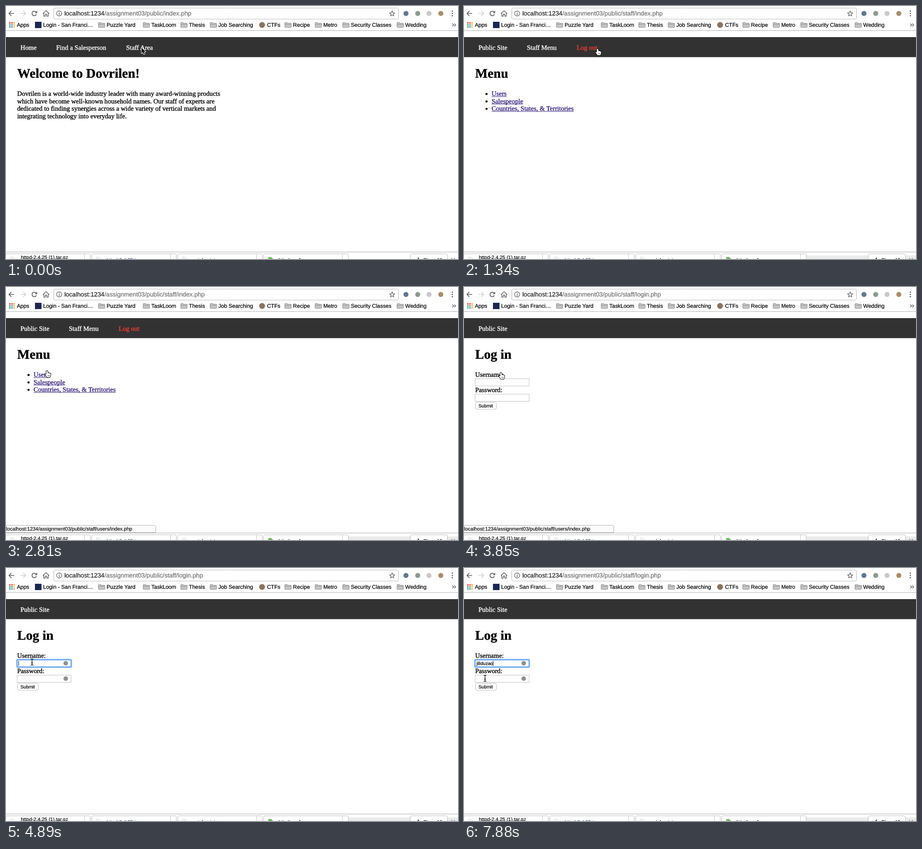
These frames come from a looping animation (999 by 561 pixels, 8 s). An HTML page with a canvas:

```html
<!DOCTYPE html>
<html lang="en">
<head>
<meta charset="utf-8">
<title>Staff login</title>
<style>
html, body { margin: 0; width: 100%; height: 100%; overflow: hidden; background: #fff }
canvas { display: block }
</style>
</head>
<body>
<canvas id="stage" width="999" height="561"></canvas>
<script>
const ctx = document.getElementById('stage').getContext('2d');
const LOOP = 8000, TICK = 148.6;
const SERIF = '"Liberation Serif", serif', SANS = '"Liberation Sans", sans-serif';
const BODY = 14.6, BASE = 'localhost:1234', SITE = '/assignment03/public/';
const USER = 'jiliduzao';
const KEY_TIMES = [5490, 5790, 5940, 6090, 6240, 6540, 6690, 6830, 6980];
const FOLDERS = [[204, 'Puzzle Yard'], [303, 'TaskLoom'], [386, 'Thesis'], [451, 'Job Searching'],
  [616, 'Recipe'], [683, 'Metro'], [744, 'Security Classes'], [864, 'Wedding']];

ctx.textRendering = 'geometricPrecision';
ctx.lineJoin = 'round';

// A hairline stroke gives the fuller weight of desktop font smoothing
function text(s, x, y, size, color = '#000', family = SERIF, weight = '') {
  ctx.font = `${weight} ${size}px ${family}`;
  ctx.fillStyle = ctx.strokeStyle = color;
  ctx.lineWidth = family == SERIF ? 0.4 : 0.25;
  ctx.fillText(s, x, y);
  ctx.strokeText(s, x, y);
  return ctx.measureText(s).width;
}
function rect(x, y, w, h, color) {
  ctx.fillStyle = color;
  ctx.fillRect(x, y, w, h);
}
function box(x, y, w, h, r, fill, stroke, line = 1) {
  ctx.beginPath();
  ctx.roundRect(x, y, w, h, r);
  paint(fill, stroke, line);
}
function disc(x, y, r, fill, stroke, line) {
  ctx.beginPath();
  ctx.arc(x, y, r, 0, 7);
  paint(fill, stroke, line);
}
function paint(fill, stroke, line = 1) {
  if (fill) { ctx.fillStyle = fill; ctx.fill(); }
  if (stroke) { ctx.strokeStyle = stroke; ctx.lineWidth = line; ctx.stroke(); }
}
function shape(d, x, y, fill, stroke, line = 1) {
  const path = new Path2D(d);
  ctx.save();
  ctx.translate(x, y);
  if (stroke) { ctx.strokeStyle = stroke; ctx.lineWidth = line; ctx.stroke(path); }
  if (fill) { ctx.fillStyle = fill; ctx.fill(path); }
  ctx.restore();
}

// Progress of a move seen in discrete screen captures
function stepped(t, start, steps) {
  const i = Math.floor((t - start) / TICK + 0.02) + 1;
  const p = Math.min(1, Math.max(0, i / steps));
  return p * p * (3 - 2 * p);
}
const mix = (a, b, p) => a + (b - a) * p;
const within = (t, a, b) => t >= a && t < b;

function toolbar(t, url) {
  const ink = '#5a5a5a';
  shape('M6 -5.5L0.5 0L6 5.5M0.5 0H12', 6, 16.5, null, ink, 1.7);
  shape('M6 -5.5L11.5 0L6 5.5M11.5 0H0', 32, 16.5, null, '#d0d0d0', 1.7);
  if (within(t, 890, 1190) || within(t, 3560, 3850)) {
    shape('M-5 -5L5 5M5 -5L-5 5', 63, 16.5, null, ink, 1.7);
  } else {
    ctx.beginPath();
    ctx.arc(62.5, 16.5, 5, 0.4, 5.5);
    paint(null, ink, 1.7);
    shape('M6 -6V-0.8H0.8Z', 62.8, 16.5, ink);
  }
  shape('M-7 0.5L0 -6L7 0.5M-5 -1V6H-1.6V1.5H1.6V6H5V-1', 88.5, 16.5, null, ink, 1.4);

  box(105.5, 4.5, 762, 24.5, 3, '#fff', '#b9b9b9');
  disc(117.5, 16.5, 5.6, null, ink, 1.2);
  rect(116.8, 15.5, 1.5, 4.5, ink);
  rect(116.8, 12.8, 1.5, 1.6, ink);
  const w = text(BASE, 129, 21, 13.72, '#222', SANS);
  text(SITE + url, 129 + w, 21, 13.72, '#707070', SANS);

  ctx.beginPath();
  for (let i = 0; i < 10; i++) {
    const r = i % 2 ? 2.7 : 6.2, a = i * Math.PI / 5 - Math.PI / 2;
    ctx.lineTo(853.5 + r * Math.cos(a), 17 + r * Math.sin(a));
  }
  ctx.closePath();
  paint(null, ink, 1.2);
  disc(884, 16.5, 5.5, '#61788e');
  disc(910, 16.5, 5.5, '#8c9a90');
  disc(935, 16.5, 5.5, '#c9c9c9');
  disc(961, 16.5, 5.5, '#a98c69');
  for (const y of [11.5, 16.5, 21.5]) disc(986.5, y, 1.4, ink);
}

function bookmarks() {
  const label = (s, x) => text(s, x, 45.7, 12, '#000', SANS);
  const dots = ['#e8453c', '#e8453c', '#f0a02c', '#3aa757', '#4285f4', '#f0b92c', '#3aa757', '#4285f4', '#f0b92c'];
  dots.forEach((c, i) => rect(7 + i % 3 * 4.6, 36 + Math.floor(i / 3) * 4.4, 3.1, 3.1, c));
  label('Apps', 24);
  rect(64, 35, 14.5, 14, '#1c2750');
  label('Login - San Franci…', 82);
  for (const [x, name] of FOLDERS) {
    shape('M0.5 9.5V1.5Q0.5 0.5 1.5 0.5H5L6.5 2H13Q14 2 14 3V9.5Q14 10.5 13 10.5H1.5Q0.5 10.5 0.5 9.5Z',
      x, 36.5, '#c4c4c4', '#777', 1.6);
    rect(x + 1, 40, 12.5, 0.8, '#888');
    label(name, x + 18.3);
  }
  disc(566, 42, 6.5, '#8a7460');
  label('CTFs', 577);
  shape('M0 0L3 3L0 6M4.3 0L7.3 3L4.3 6', 986.5, 39, null, '#444', 1.2);
  rect(0, 54, 999, 1, '#b0b0b0');
}

function shelf(t) {
  rect(0, 545, 999, 1, '#a8a8a8');
  if (t >= 150) {
    rect(757, 553, 136, 8, '#ebebeb');
    rect(976, 553, 23, 8, '#ebebeb');
  }
  const files = ['httpd-2.4.25 (1).tar.gz', 'httpd-2.4.25.tar', 'catalog.txt', 'httpd.conf'];
  files.forEach((name, i) => {
    const x = i * 190;
    box(x - 0.5, 549.5, 187, 20, 3, '#fff', '#b9b9b9');
    rect(x + 173, 550, 1, 11, '#c6c6c6');
    shape('M0 8V0H6L10 4V8', x + 10, 557, i == 3 ? '#74b867' : '#f4f4f4', i == 3 ? '#74b867' : '#bbb');
    text(name, x + (i ? 32.5 : 33), i ? 567 : 561.4, 10.9, i == 1 ? '#38587c' : '#111', SANS);
  });
  box(893.5, 549.5, 82, 20, 3, '#fff', '#b9b9b9');
  rect(910, 558, 2.5, 3, '#444');
  text('Show All', 922, 567, 10.9, '#111', SANS);
  shape('M0 0L8 8M8 0L0 8', 984, 559, null, '#777', 1.3);
}

function header(title, links) {
  rect(0, 69, 999, 44.4, '#323232');
  for (const [x, label, color = '#fff'] of links) text(label, x, 97, BODY, color);
  text(title, 24.7, 158.7, BODY * 2, '#000', SERIF, 'bold');
}

function homePage() {
  header('Welcome to Dovrilen!', [[32, 'Home'], [111, 'Find a Salesperson'], [265.5, 'Staff Area']]);
  ['Dovrilen is a world-wide industry leader with many award-winning products',
    'which have become well-known household names. Our staff of experts are',
    'dedicated to finding synergies across a wide variety of vertical markets and',
    'integrating technology into everyday life.'
  ].forEach((line, i) => text(line, 24.7, 199.2 + i * 16.45, BODY));
}

function menuPage() {
  header('Menu', [[32, 'Public Site'], [139, 'Staff Menu'], [249, 'Log out', '#f23c32']]);
  ['Users', 'Salespeople', 'Countries, States, & Territories'].forEach((name, i) => {
    const y = 199.2 + i * 16.45;
    disc(49.8, y - 4, 2.4, '#000');
    const w = text(name, 61, y, BODY, '#35207c');
    rect(61, y + 1.3, w, 1, '#35207c');
  });
}

function loginPage(t) {
  header('Log in', [[32, 'Public Site']]);
  text('Username:', 24.7, 199.2, BODY);
  text('Password:', 24.7, 233.2, BODY);
  for (const y of [203.5, 237.5]) {
    box(24.5, y, 119.5, 16, 0, '#fff', '#c0c0c0');
    if (t >= 4000) disc(132, y + 7.8, 5, '#909090');
  }
  box(25.5, 255.5, 46, 15.5, 3, '#fff', '#bdbdbd');
  text('Submit', 32, 267, 10.2, '#000', SANS);

  if (t >= 4740) {
    box(24, 203, 120.5, 17, 2, null, 'rgba(110,170,245,.45)', 4);
    box(24.5, 203.5, 119.5, 16, 1, null, '#5c9ff0', 1.8);
  }
  const typed = USER.slice(0, KEY_TIMES.filter(k => t >= k).length);
  const w = text(typed, 27.6, 215.3, 10.04, '#000', SANS);
  const caretOff = t < 4890 || within(t, 5340, 5490) || within(t, 7430, 7880);
  if (!caretOff) rect(27.5 + w, 206, 1, 11, '#000');
}

function status(url, fill) {
  box(-2.5, 528.5, 333.5, 16, [0, 3, 0, 0], fill, '#b0b0b0');
  text(BASE + SITE + url, 0.3, 540.3, 11, '#111', SANS);
}

const arrowCursor = (x, y) =>
  shape('M0 0V13L3 10.3L5 15L7.2 14.1L5.2 9.6L9 9.4Z', x, y, '#111', '#fff', 2);
const handCursor = (x, y) => {
  const d = 'M-1.6 1Q0 -1 1.6 1L1.9 5Q3.2 4 4.1 5.3Q5.6 4.6 6.2 6Q8 5.5 8 7.6L7.6 11L6.4 14H0' +
    'L-1.5 11.5L-4 8.2Q-4 6 -2.2 7.2L-1.3 8.2Z';
  shape(d, x, y, '#fff', '#000', 2);
  shape('M1.8 9V12M3.6 9V12M5.4 9V12', x, y, null, '#555', 0.8);
};
const beamCursor = (x, y) =>
  shape('M-3 -7Q0 -7 0 -5Q0 -7 3 -7M0 -5V5M-3 7Q0 7 0 5Q0 7 3 7M-1.8 2H1.8', x, y, null, '#111', 1.3);

function cursor(t) {
  if (t < 300) {
    const p = stepped(t, 150, 2);
    arrowCursor(mix(299.5, 295, p), mix(92, 95, p));
  } else if (t < 4000) {
    const p = stepped(t, 1790, 8);
    const draw = p > 0.05 && p < 0.95 ? arrowCursor : handCursor;
    draw(mix(295, 81.5, p), mix(95, 190, p));
  } else if (t < 5340) {
    const p = stepped(t, 4000, 5);
    beamCursor(mix(83, 57.5, p), mix(197, 208.5, p));
  } else if (t >= 7430) {
    const p = stepped(t, 7580, 3);
    beamCursor(mix(57.5, 46.5, p), mix(208.5, 244.5, p));
  }
}

function draw() {
  const t = performance.now() % LOOP;
  rect(0, 0, 999, 561, '#fff');
  toolbar(t, t < 890 ? 'index.php' : t < 3710 ? 'staff/index.php' : 'staff/login.php');
  bookmarks();
  if (t < 1040) homePage();
  else if (t < 3710) menuPage();
  else loginPage(t);
  shelf(t);
  if (within(t, 450, 1340)) status('staff/index.php', '#f0f0f0');
  if (within(t, 2810, 4150)) status('staff/users/index.php', '#fcfcfc');
  cursor(t);
  requestAnimationFrame(draw);
}
draw();
</script>
</body>
</html>
```
